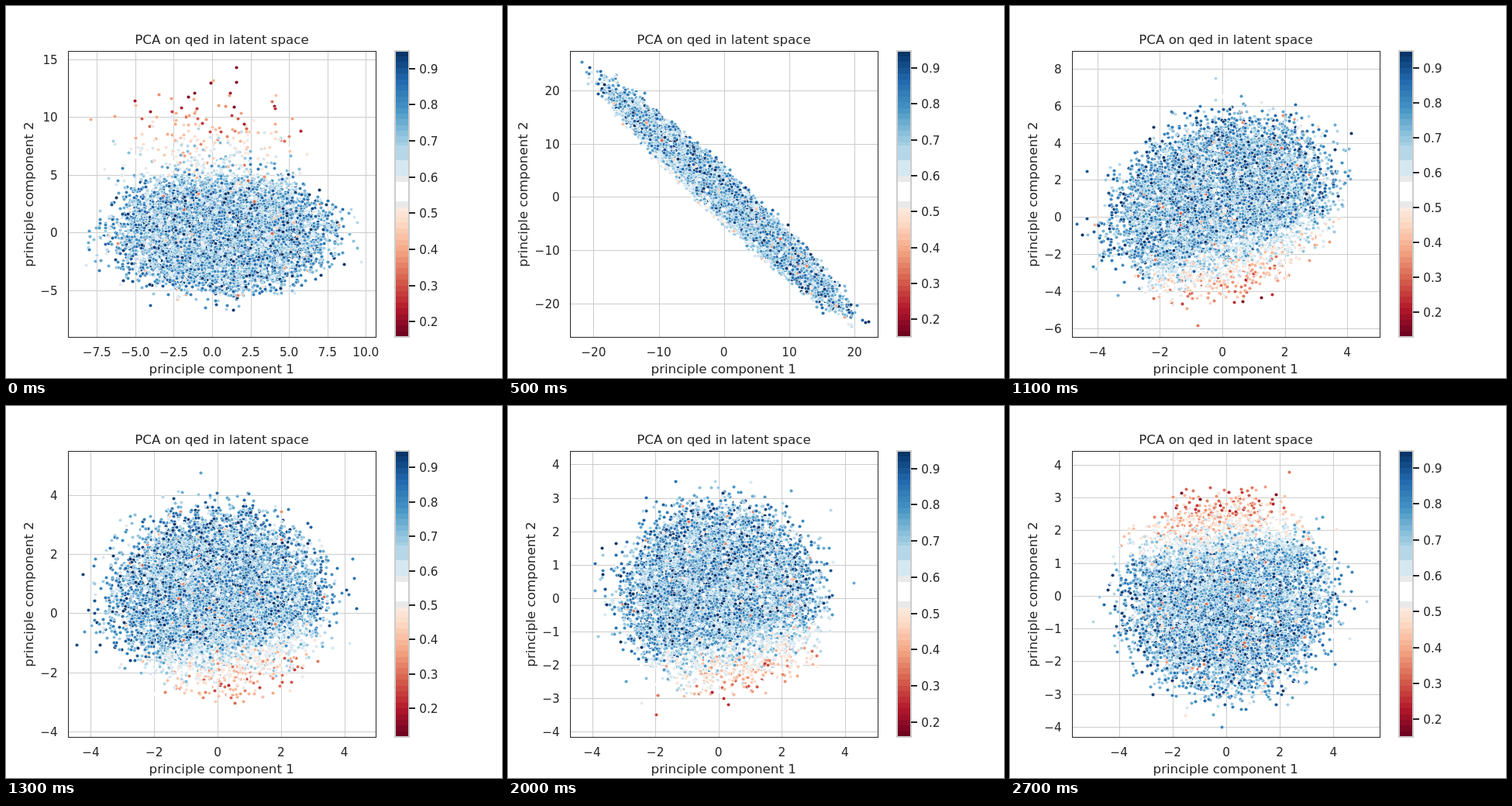
Animation, 640 px wide and 480 px high, one loop 2.8 s. Source, as an HTML page with a canvas:

```html
<!DOCTYPE html>
<html lang="en">
<head>
<meta charset="utf-8">
<title>PCA scatter</title>
<style>
  html, body { margin: 0; width: 100%; height: 100%; overflow: hidden; background: #fff; }
  canvas { display: block; width: 640px; height: 480px; }
</style>
</head>
<body>
<canvas id="stage" width="640" height="480"></canvas>
<script>
const ctx = document.getElementById('stage').getContext('2d');
const STEP_MS = 100, STEPS = 28, POINTS = 9000;
const BOX = { left: 80, right: 477, top: 58, bottom: 427 };
const INK = '#262626', PALE = '#cccccc';
const font = px => `${px}px "DejaVu Sans", sans-serif`;
const LABEL = font(16.67), TICK = font(15.28);

// x, y, bar: pixel position of a reference value, pixels per unit.
// mid, p, q: centre and half axes of the cloud; tilt: direction of the low values in (p, q).
const firstRound = {
  at: 12, x: [273, 40.9], y: [267.4, 38.1], bar: [79.3, 444],
  mid: [273, 247], p: [127, 0], q: [0, -104], tilt: [0.2, -0.95], tail: 0
};
const scenes = [
  { at: 0, x: [266, 19.83], y: [292.3, 14.9], bar: [80.5, 467],
    mid: [278, 293], p: [130, 0], q: [0, -70], tilt: [0, 0.55], tail: 0.055 },
  { at: 5, x: [278.7, 8.42], y: [246.4, 6.87], bar: [80, 463],
    mid: [280, 247], p: [138, 130], q: [16, -17], tilt: [-0.1, -0.65], tail: 0 },
  { at: 9, x: [276, 39.06], y: [281.8, 9.42], bar: [80, 466],
    mid: [270, 269], p: [139, -66], q: [0, -94], tilt: [0.5, -0.3], tail: 0 },
  firstRound,
  { ...firstRound, at: 13 },
  { at: 17, x: [270.2, 36.9], y: [270.3, 36.97], bar: [79.3, 444],
    mid: [267, 254], p: [130, 0], q: [0, -107], tilt: [0.4, -0.85], tail: 0 },
  { at: 20, x: [271.7, 40.8], y: [247.8, 43.1], bar: [80.5, 468],
    mid: [273, 243], p: [118, 0], q: [0, -109], tilt: [0.25, -0.95], tail: 0 },
  { at: 27, x: [279, 34.6], y: [244.8, 42.3], bar: [80, 463],
    mid: [280, 248], p: [121, 0], q: [0, -114], tilt: [-0.12, 1.08], tail: 0 }
];

const mix = (a, b, k) => a + (b - a) * k;
const mixPair = (a, b, k) => a.map((v, i) => mix(v, b[i], k));
const mixAxis = (a, b, k) => [mix(a[0], b[0], k), a[1] * (b[1] / a[1]) ** k];

function sceneAt(step) {
  const next = scenes.findIndex(s => s.at >= step);
  const b = scenes[next], a = scenes[Math.max(0, next - 1)];
  const k = b === a ? 0 : (step - a.at) / (b.at - a.at);
  const scene = { tilt: (k < 0.5 ? a : b).tilt, tail: mix(a.tail, b.tail, k) };
  for (const key of ['x', 'y', 'bar']) scene[key] = mixAxis(a[key], b[key], k);
  for (const key of ['mid', 'p', 'q']) scene[key] = mixPair(a[key], b[key], k);
  return scene;
}

function seeded(seed) {
  let s = seed >>> 0;
  return () => {
    s = (s + 0x6D2B79F5) >>> 0;
    let z = Math.imul(s ^ (s >>> 15), 1 | s);
    z = (z + Math.imul(z ^ (z >>> 7), 61 | z)) ^ z;
    return ((z ^ (z >>> 14)) >>> 0) / 4294967296;
  };
}

const RAMP = ['67001f', 'b2182b', 'd6604d', 'f4a582', 'fddbc7', 'f7f7f7',
  'd1e5f0', '92c5de', '4393c3', '2166ac', '053061']
  .map(hex => [0, 2, 4].map(i => parseInt(hex.slice(i, i + 2), 16)));

function shade(t) {
  if (t > 0.474 && t < 0.542) return '#ffffff';
  if (t > 0.452 && t < 0.564) return '#e9e9e9';
  if (t >= 0.564 && t < 0.67) t = t < 0.618 ? 0.59 : 0.645;
  else t = (Math.floor(t * 50) + 0.5) / 50;
  const i = Math.min(9, Math.floor(t * 10));
  return `rgb(${mixPair(RAMP[i], RAMP[i + 1], t * 10 - i).map(Math.round)})`;
}

function makeDot(color) {
  const dot = document.createElement('canvas');
  dot.width = dot.height = 7;
  const c = dot.getContext('2d');
  for (const [fill, r] of [['#fff', 2.45], [color, 2.05]]) {
    c.fillStyle = fill;
    c.beginPath();
    c.arc(3.5, 3.5, r, 0, Math.PI * 2);
    c.fill();
  }
  return dot;
}
const dots = Array.from({ length: 100 }, (_, i) => makeDot(shade((i + 0.5) / 100)));

function text(str, x, y, align, style) {
  ctx.font = style;
  ctx.textAlign = align;
  ctx.fillStyle = INK;
  ctx.fillText(str, x, y);
}

function ticks(low, high) {
  const raw = (high - low) / 9;
  const unit = 10 ** Math.floor(Math.log10(raw));
  const step = [1, 2, 2.5, 5, 10].find(n => n * unit >= raw) * unit;
  const list = [];
  for (let n = Math.ceil(low / step); n * step <= high; n++) {
    const value = n * step;
    const label = Math.abs(value).toFixed(step % 1 ? 1 : 0);
    list.push({ value, label: (value < 0 ? '\u2212' : '') + label });
  }
  return list;
}

function drawGrid({ x: [x0, sx], y: [y0, sy] }) {
  const { left, right, top, bottom } = BOX;
  for (const { value, label } of ticks((left - x0) / sx, (right - x0) / sx)) {
    const x = x0 + value * sx;
    ctx.fillStyle = PALE;
    ctx.fillRect(Math.round(x), top, 1, bottom - top);
    text(label, x, 452, 'center', TICK);
  }
  let widest = 0;
  for (const { value, label } of ticks((y0 - bottom) / sy, (y0 - top) / sy)) {
    const y = Math.round(y0 - value * sy);
    ctx.fillStyle = PALE;
    ctx.fillRect(left, y, right - left, 1);
    text(label, 66.8, y + 6, 'right', TICK);
    widest = Math.max(widest, ctx.measureText(label).width);
  }
  text('PCA on qed in latent space', 278.5, 49, 'center', LABEL);
  text('principle component 1', 278.2, 474, 'center', LABEL);
  ctx.save();
  ctx.translate(Math.round(66.8 - widest - 9.5), 243);
  ctx.rotate(-Math.PI / 2);
  text('principle component 2', 0, 0, 'center', LABEL);
  ctx.restore();
}

function drawCloud({ mid, p, q, tilt, tail }, seed) {
  const rand = seeded(seed);
  const gauss = () => (rand() + rand() + rand() - 1.5) * 2;
  ctx.save();
  ctx.beginPath();
  ctx.rect(BOX.left, BOX.top, BOX.right - BOX.left, BOX.bottom - BOX.top);
  ctx.clip();
  for (let i = 0; i < POINTS; i++) {
    const angle = rand() * Math.PI * 2;
    const spread = rand() < 0.04 ? 0.3 : 0.17;
    const r = rand() ** 0.57 * (1 + spread * gauss());
    let u = r * Math.cos(angle), v = r * Math.sin(angle);
    if (rand() < tail) {
      u = gauss() * 0.42 - 0.1;
      v = 0.65 + Math.abs(gauss()) * 0.85;
    }
    const low = 0.62 * Math.max(0, u * tilt[0] + v * tilt[1] - 0.4);
    let t = 0.78 + 0.12 * gauss() - low;
    if (rand() < 0.025) t = 0.2 + rand() * 0.3;
    t = Math.min(0.98, Math.max(0.03, t));
    const x = mid[0] + u * p[0] + v * q[0];
    const y = mid[1] + u * p[1] + v * q[1];
    ctx.drawImage(dots[Math.floor(t * 100)], Math.round(x - 3.5), Math.round(y - 3.5));
  }
  ctx.restore();
}

function drawBar([top, scale]) {
  for (let y = BOX.top; y < BOX.bottom; y++) {
    ctx.fillStyle = shade((427.2 - y - 0.5) / 369.6);
    ctx.fillRect(502, y, 18, 1);
  }
  ctx.strokeStyle = PALE;
  ctx.lineWidth = 2;
  ctx.strokeRect(502, 58, 18, 369);
  for (let n = 9; n > 0; n--) {
    const y = Math.round(top + (9 - n) * scale / 10);
    if (y > BOX.bottom) break;
    ctx.fillStyle = INK;
    ctx.fillRect(520, y - 1, 8, 2);
    text(`0.${n}`, 533.3, y + 5.6, 'left', TICK);
  }
}

function draw(step) {
  const scene = sceneAt(step);
  ctx.fillStyle = '#fff';
  ctx.fillRect(0, 0, 640, 480);
  drawGrid(scene);
  drawCloud(scene, step * 7919 + 17);
  ctx.strokeStyle = INK;
  ctx.lineWidth = 1;
  ctx.strokeRect(80.5, 58.5, 397, 369);
  drawBar(scene.bar);
}

let shown = -1;
function tick() {
  const step = Math.floor(performance.now() / STEP_MS) % STEPS;
  if (step !== shown) draw(shown = step);
  requestAnimationFrame(tick);
}
tick();
</script>
</body>
</html>
```
